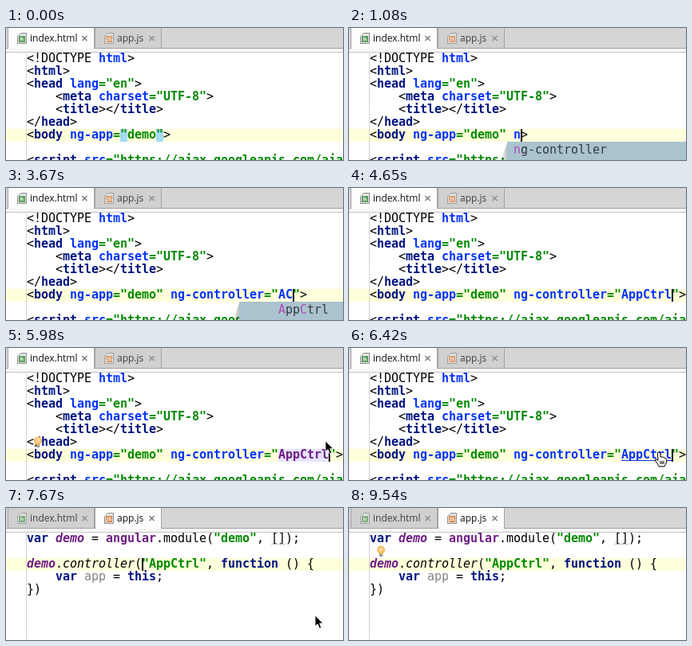
An HTML page with a canvas for the animation above (9800 ms loop, 422 px wide and 166 px high).

```html
<!DOCTYPE html>
<html lang="en">
<head>
<meta charset="utf-8">
<style>
html, body { margin: 0; width: 100%; height: 100%; overflow: hidden; background: #fff; }
canvas { display: block; }
</style>
</head>
<body>
<canvas id="stage" width="422" height="166"></canvas>
<script>
const ctx = document.getElementById('stage').getContext('2d');
const W = 422, H = 166, LOOP = 9800;
const LEFT = 26, TOP = 31, CELL = 9, ROW = 16;
const MONO = '15px "DejaVu Sans Mono", monospace';

const STYLES = {
  plain: ['', '#000'],
  tag: ['bold', '#011480'],
  attr: ['bold', '#0433ff'],
  str: ['bold', '#008a00'],
  global: ['bold', '#701f85'],
  globalItalic: ['italic bold', '#701f85'],
  method: ['italic', '#000'],
  unused: ['', '#808080'],
  popup: ['', '#333a3d'],
  match: ['', '#b04cb8']
};

const HTML_LINES = [
  [['plain', '<!DOCTYPE '], ['attr', 'html'], ['plain', '>']],
  [['plain', '<'], ['tag', 'html'], ['plain', '>']],
  [['plain', '<'], ['tag', 'head '], ['attr', 'lang'], ['str', '="en"'], ['plain', '>']],
  [['plain', '    <'], ['tag', 'meta '], ['attr', 'charset'], ['str', '="UTF-8"'], ['plain', '>']],
  [['plain', '    <'], ['tag', 'title'], ['plain', '></'], ['tag', 'title'], ['plain', '>']],
  [['plain', '</'], ['tag', 'head'], ['plain', '>']],
  null,
  [],
  [['plain', '<'], ['tag', 'script '], ['attr', 'src'], ['str', '="https://ajax.googleapis.com/aja']]
];

const JS_LINES = [
  [['tag', 'var '], ['globalItalic', 'demo'], ['plain', ' = '], ['global', 'angular'], ['plain', '.module('],
    ['str', '"demo"'], ['plain', ', []);']],
  [],
  [['globalItalic', 'demo'], ['plain', '.'], ['method', 'controller'], ['plain', '('], ['str', '"AppCtrl"'],
    ['plain', ', '], ['tag', 'function '], ['plain', '() {']],
  [['plain', '    '], ['tag', 'var '], ['unused', 'app'], ['plain', ' = '], ['tag', 'this'], ['plain', ';']],
  [['plain', '})']]
];

const colX = col => LEFT + col * CELL;
const rowY = row => TOP + row * ROW;
const within = (t, a, b) => t >= a && t < b;

function rect(color, x, y, w, h) {
  ctx.fillStyle = color;
  ctx.fillRect(x, y, w, h);
}

// Draws styled runs on the fixed character grid.
function drawRuns(runs, x, baseline) {
  for (const [name, text] of runs) {
    const [face, color] = STYLES[name];
    ctx.font = `${face} ${MONO}`;
    ctx.fillStyle = color;
    for (const ch of text) {
      if (ch !== ' ') ctx.fillText(ch, x, baseline);
      x += CELL;
    }
  }
}

const drawLine = (runs, row) => drawRuns(runs, LEFT, rowY(row) + 12);
const drawCaret = (col, row) => rect('#000', colX(col), rowY(row), 2, ROW);

function polygon(points, fill, stroke) {
  ctx.beginPath();
  points.forEach(([x, y]) => ctx.lineTo(x, y));
  ctx.closePath();
  ctx.fillStyle = fill;
  ctx.fill();
  if (stroke) {
    ctx.strokeStyle = stroke;
    ctx.lineWidth = 1;
    ctx.stroke();
  }
}

function drawTab(x, w, label, badge, letters, active) {
  rect(active ? '#fdfdfd' : '#d0d0d0', x, 0, w, 26);
  rect('#a4a4a4', x, 0, 1, 26);
  rect('#a4a4a4', x + w, 0, 1, 26);
  ctx.globalAlpha = active ? 1 : 0.75;
  const ix = x + 12.5;
  polygon([[ix + 4, 6.5], [ix + 11, 6.5], [ix + 11, 19.5], [ix, 19.5], [ix, 10.5]], '#e4e6e4', '#8c8c8c');
  rect(badge, ix + 1.5, 10, 8, 8);
  ctx.font = 'bold 6px "DejaVu Sans", sans-serif';
  ctx.fillStyle = '#fff';
  ctx.textAlign = 'center';
  ctx.fillText(letters, ix + 5.5, 16.3);
  ctx.textAlign = 'left';
  ctx.font = '12px "Open Sans", sans-serif';
  ctx.fillStyle = '#111';
  ctx.fillText(label, x + 28, 17);
  const cx = x + w - 11.5;
  ctx.strokeStyle = '#777';
  ctx.lineWidth = 1.4;
  ctx.beginPath();
  ctx.moveTo(cx - 3, 10);
  ctx.lineTo(cx + 3, 16);
  ctx.moveTo(cx + 3, 10);
  ctx.lineTo(cx - 3, 16);
  ctx.stroke();
  ctx.globalAlpha = 1;
}

function drawFrame(jsActive, caretRow) {
  rect('#fff', 0, 0, W, H);
  rect('#d6d6d6', 0, 0, W, 26);
  drawTab(2, 108, 'index.html', '#5f9e5f', 'h', !jsActive);
  drawTab(111, 83, 'app.js', '#d98248', 'JS', jsActive);
  rect('#a0a0a0', 0, 25, W, 1);
  if (jsActive) rect('#fdfdfd', 112, 25, 82, 1);
  else rect('#fdfdfd', 3, 25, 107, 1);
  rect('#f6f6f6', 0, 26, W, 4);
  rect('#c6c6c6', 0, 30, W, 1);
  rect('#ffffdc', 0, rowY(caretRow), W, ROW);
  for (let y = TOP + 1; y < H; y += 2) rect('#a8a8a8', 25, y, 1, 1);
}

function drawBulb(row) {
  const y = rowY(row);
  const glow = ctx.createRadialGradient(40, y + 5, 1, 40, y + 5, 5.5);
  glow.addColorStop(0, '#fde0a4');
  glow.addColorStop(1, '#efab45');
  ctx.fillStyle = glow;
  ctx.beginPath();
  ctx.arc(40, y + 5.5, 5, 0, Math.PI * 2);
  ctx.fill();
  rect('#f0b45a', 37.5, y + 9, 5, 2);
  rect('#9a9a9a', 38, y + 11, 4, 3);
}

function drawPopup(x, textX, runs) {
  const shadow = ctx.createLinearGradient(x - 8, 0, x, 0);
  shadow.addColorStop(0, 'rgba(0, 0, 0, 0)');
  shadow.addColorStop(1, 'rgba(0, 0, 0, 0.25)');
  polygon([[x - 8, H], [x, 145], [x, H]], shadow);
  rect('#aac3cf', x, 143, W - x, H - 143);
  drawRuns(runs, textX, 158);
}

function drawArrow(x, y) {
  const shape = [[0, 0], [0, 14], [3.2, 11], [5.6, 16.5], [8, 15.4], [5.7, 10.2], [10, 10]];
  polygon(shape.map(([dx, dy]) => [x + dx, y + dy]), '#000', '#fff');
}

function drawHand(x, y) {
  const shape = [[4, 0], [6, 0], [7, 2], [7, 6], [10, 6], [14, 8], [15, 10], [14, 14],
    [12, 18], [5, 18], [3, 14], [0, 10], [1, 8.5], [4, 10.5], [3.5, 2]];
  polygon(shape.map(([dx, dy]) => [x + dx, y + dy]), '#fff', '#000');
  for (const dx of [6.5, 8.5, 10.5]) rect('#000', x + dx, y + 11, 1, 4);
}

function bodyRuns(t) {
  const runs = [['plain', '<'], ['tag', 'body '], ['attr', 'ng-app'], ['str', '="demo"']];
  if (t >= 360) runs.push(['plain', ' ']);
  if (within(t, 450, 2330)) runs.push(['attr', 'n']);
  if (t >= 2330) {
    const value = t >= 4650 ? 'AppCtrl' : t >= 3670 ? 'AC' : t >= 3140 ? 'A' : '';
    const style = within(t, 4910, 6420) ? 'global' : 'attr';
    runs.push(['attr', 'ng-controller'], ['str', '="'], [style, value], ['str', '"']);
  }
  runs.push(['plain', '>']);
  return runs;
}

function htmlCaret(t) {
  if (t < 360 || within(t, 1800, 2330) || within(t, 4300, 4650) || within(t, 6770, 7220)) return -1;
  if (t < 450) return 20;
  if (t < 1800) return 21;
  if (t < 3140) return 35;
  if (t < 3670) return 36;
  if (t < 4300) return 37;
  return t < 7220 ? 42 : 40;
}

function drawHtml(t) {
  drawFrame(false, 6);
  if (t < 360) for (const col of [13, 18]) rect('#a4dcf3', colX(col), rowY(6), CELL, ROW);
  if (within(t, 4910, 6420)) rect('#e6e4ff', colX(35), rowY(6), 7 * CELL, ROW);
  HTML_LINES.forEach((line, row) => drawLine(line || bodyRuns(t), row));
  if (t >= 6420) rect('#0433ff', colX(35), rowY(6) + 14, 7 * CELL, 1);
  if (within(t, 3050, 3140) || within(t, 5440, 6420)) drawBulb(5);
  const caret = htmlCaret(t);
  if (caret >= 0) drawCaret(caret, 6);

  if (within(t, 540, 2240)) drawPopup(198, colX(20), [['match', 'n'], ['popup', 'g-controller']]);
  if (within(t, 3140, 4560)) {
    const second = t >= 3670 ? 'match' : 'popup';
    drawPopup(292, colX(35), [['match', 'A'], ['popup', 'pp'], [second, 'C'], ['popup', 'trl']]);
  }

  if (within(t, 5800, 6420)) {
    const p = 1 - Math.pow(1 - Math.floor((t - 5800) / 90) / 7, 2.6);
    drawArrow(418 - 31 * p, 91 + 44 * p);
  } else if (t >= 6420) {
    drawHand(383, 131);
  }
}

function drawJs(t) {
  drawFrame(true, 2);
  JS_LINES.forEach(drawLine);
  ctx.strokeStyle = '#b0b0b0';
  ctx.lineWidth = 1;
  ctx.beginPath();
  for (let x = 0; x <= 18; x += 2) ctx.lineTo(colX(34) + x, rowY(0) + (x % 4 ? 13.5 : 15.5));
  ctx.stroke();
  if (t >= 8210) drawBulb(1);
  if (t < 8290 || within(t, 8830, 9370)) drawCaret(16, 2);
  if (t < 7400) {
    drawHand(383, 131);
  } else if (t < 9540) {
    const step = t < 9100 ? 0 : Math.floor((t - 9100) / 89) + 1;
    const p = Math.pow(step / 5, 1.5);
    drawArrow(387 + 2 * p, 135 + 30 * p);
  }
}

function tick(now) {
  const t = now % LOOP;
  if (t < 7310) drawHtml(t);
  else drawJs(t);
  requestAnimationFrame(tick);
}
requestAnimationFrame(tick);
</script>
</body>
</html>
```
